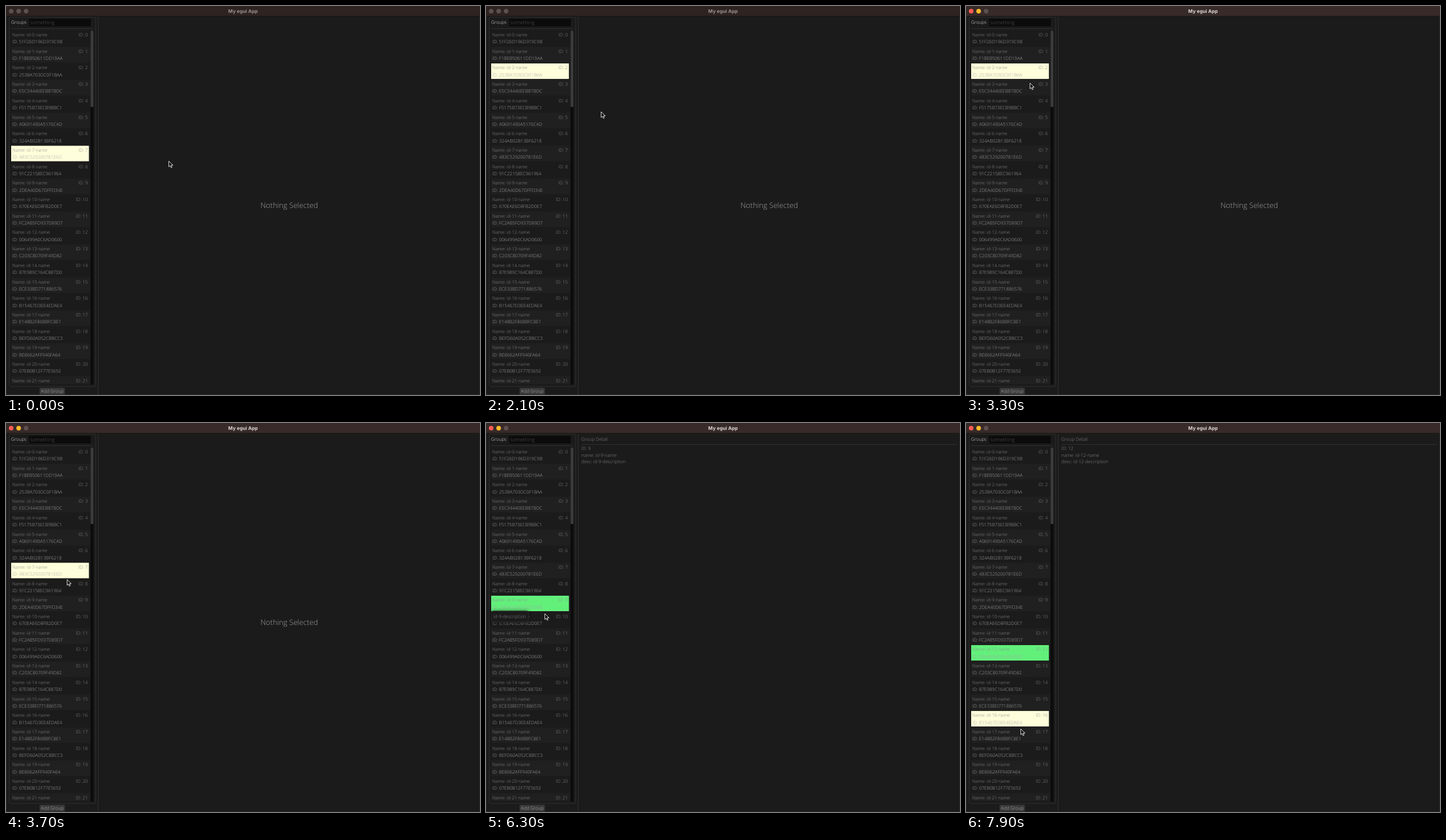
An HTML page that plays this animation: 825x678 px, repeating every 8000 ms.

```html
<!DOCTYPE html>
<html lang="en">
<head>
<meta charset="utf-8">
<title>My egui App</title>
<style>
  html, body { margin: 0; width: 100%; height: 100%; overflow: hidden; background: #1b1b1b; }
  svg { display: block; width: 825px; height: 678px; }
  text {
    font: 300 8px "Open Sans", "Noto Sans", sans-serif;
    fill: #8c8c8c;
    text-rendering: geometricPrecision;
    white-space: pre;
  }
  .name { font-size: 7.85px; }
  .hex { fill: #a6a6a6; }
  .end { text-anchor: end; }
  .mid { text-anchor: middle; }
  .strong { fill: #e2e2e2; }
  .hint { font-size: 9px; fill: #555; }
  .big { font-size: 13.1px; fill: #a0a0a0; }
  .line { fill: none; stroke: #353535; stroke-width: .8; }
  #bar { fill: #2e2321; }
  #title { font: 700 8.4px Inter, Roboto, sans-serif; fill: #9a908e; }
  .light { fill: #5b504e; }
  .active #bar { fill: #372a28; }
  .active #title { fill: #ded7d5; }
  .active #close { fill: #ff5b52; }
  .active #mini { fill: #fdbb2d; }
  .row { fill: none; }
  .odd { fill: #202020; }
  .mark { fill: none; }
  .hover { fill: #fffedb; }
  .picked { fill: #62f07b; }
</style>
</head>
<body>
<svg id="app" viewBox="0 0 825 678">
  <defs>
    <clipPath id="view"><rect x="6" y="42" width="142" height="617"/></clipPath>
    <filter id="soft" x="-30%" y="-80%" width="160%" height="260%"><feGaussianBlur stdDeviation="3.2"/></filter>
  </defs>
  <rect width="825" height="678" fill="#1b1b1b"/>
  <rect id="bar" width="825" height="18"/>
  <rect y="17.5" width="825" height="1" fill="#151212"/>
  <circle id="close" class="light" cx="9" cy="9" r="4"/>
  <circle id="mini" class="light" cx="22" cy="9" r="4"/>
  <circle class="light" cx="35" cy="9" r="4"/>
  <text id="title" class="mid" x="412.5" y="11.9">My egui App</text>

  <path class="line" d="M160.5 18.5V678M9 39.5H152"/>
  <rect class="line" x="5.5" y="19.5" width="150.5" height="643.5" rx="1.5"/>
  <text class="strong" x="9" y="30.6">Groups</text>
  <rect x="40" y="22.5" width="107.5" height="13" rx="1.3" fill="#0b0b0b"/>
  <text class="hint" x="42" y="32">something</text>

  <g id="rows" clip-path="url(#view)"></g>
  <rect x="147" y="42" width="5.5" height="618" rx="1.5" fill="#0c0c0c"/>
  <rect x="147.3" y="42.5" width="4.8" height="133.5" rx="1.5" fill="#3c3c3c"/>

  <rect x="58.5" y="665.5" width="44" height="11.5" rx="1.3" fill="#3a3a3a"/>
  <text class="mid" x="80.5" y="673.8" style="fill:#b4b4b4">Add Group</text>

  <text id="empty" class="big mid" x="493" y="352.4">Nothing Selected</text>
  <g id="detail">
    <text x="166" y="30.5">Group Detail:</text>
    <path class="line" d="M166 37.5H820"/>
    <text id="dId" x="166" y="47.4"></text>
    <text id="dName" x="166" y="58.8"></text>
    <text id="dDesc" x="166" y="70.1"></text>
  </g>

  <g id="tip">
    <rect class="box" x="9.5" y="0" height="19" rx="3" fill="#000" opacity=".65" filter="url(#soft)"/>
    <rect class="box" x="9.5" y="0" height="19" rx="3" fill="#1b1b1b" stroke="#343434" stroke-width=".7"/>
    <text id="tipText" x="13" y="11.9"></text>
  </g>

  <path d="M.5 18V677.5H824.5V18" fill="none" stroke="#2c2a2a"/>
  <path id="cursor" d="M.4 .4V10.2L2.7 8.1L4.2 11.8L5.9 11.1L4.4 7.5H7.6Z"
        fill="#000" stroke="#f4f4f4" stroke-width=".95" stroke-linejoin="round"/>
</svg>
<script>
const LOOP = 8000, STEP = 100, TOP = 42.7, PITCH = 28.7, ROW_H = 27;
const $ = id => document.getElementById(id);

const codes = `51F26D196D319C9B F1BEB50611DD19AA 253BA703DC0F1BAA E5C34440EEB87BDC
F5175B73ECB9BBC1 A0691490A5176CAD 324AB02B13BF6218 483C529200781E6D 91C22158EC961964
2DEA40D67DFFD34E 670EAE6D8FB2D0E7 FC2AB5FD937D89D7 006499A0C6AD0600 C203C80709F49D82
87E989C164C887D0 ECE33BD771886576 B15467D3EE4EDAE4 E148B2F86BBFC8E1 BEFD60A052CBBCC3
BE8662AFF940FA64 07EB0B12F77E5692`.split(/\s+/);

// [time, x, y] of the pointer tip
const path = [
  [0, 283, 270], [300, 215, 232], [500, 150, 196], [700, 106, 153], [800, 98, 138],
  [1000, 92, 102], [1200, 88, 70], [1400, 94, 52], [1600, 110, 72], [1800, 134, 118],
  [2100, 200, 184], [2500, 375, 232], [2700, 402, 238], [3000, 250, 186], [3200, 130, 140],
  [3300, 111, 134], [3400, 108, 160], [3600, 106, 246], [3800, 106, 299], [4100, 106, 299],
  [4400, 106, 326], [4900, 106, 326], [5100, 105, 331], [6100, 105, 331], [6200, 102, 332],
  [6300, 102, 332], [6900, 100, 402], [7000, 100, 402], [7600, 100, 406], [7700, 100, 406],
  [7900, 95, 533]
];

// [time, value] switches
const hovers = [
  [0, 7], [600, 5], [700, 4], [900, 3], [1000, 2], [1100, 1], [1400, 0], [1600, 1], [1700, 2],
  [3400, 3], [3500, 5], [3600, 6], [3700, 7], [3800, 8], [4200, 9], [6500, 10], [6700, 11],
  [6800, 12], [7800, 14], [7900, 16]
];
const picks = [[0, -1], [5400, 9], [7200, 12]];
const tips = [[0, false], [4500, true], [5000, false], [5700, true], [6400, false], [7500, true], [7800, false]];
const focus = [[0, false], [2500, true]];

const at = (list, t) => list.filter(e => e[0] <= t).pop()[1];

function pointer(t) {
  const i = path.findIndex(p => p[0] > t);
  if (i < 0) return path[path.length - 1].slice(1);
  const [a, b] = [path[i - 1], path[i]];
  const k = (t - a[0]) / (b[0] - a[0]);
  return [1, 2].map(n => a[n] + (b[n] - a[n]) * k);
}

const rowTop = i => TOP + PITCH * i;

function rowMarkup(i) {
  const y = rowTop(i);
  return `<rect class="row ${i % 2 ? 'odd' : ''}" x="9" y="${y}" width="137.5" height="${ROW_H}"/>
    <rect class="mark" x="9" y="${y}" width="135.3" height="${ROW_H}"/>
    <text class="name" x="11" y="${y + 10.3}">Name: id-${i}-name</text>
    <text class="end" x="142.3" y="${y + 10.3}">ID: ${i}</text>
    <text class="hex" x="11" y="${y + 22.6}">ID: ${codes[i] || ''}</text>`;
}

$('rows').innerHTML = Array.from({ length: 22 }, (_, i) => rowMarkup(i)).join('');
const marks = document.querySelectorAll('.mark');
const boxes = document.querySelectorAll('.box');
const show = (el, on) => el.style.display = on ? '' : 'none';

function draw(t) {
  const hover = at(hovers, t), pick = at(picks, t), tip = at(tips, t);
  $('app').classList.toggle('active', at(focus, t));
  marks.forEach((m, i) => {
    m.setAttribute('class', 'mark' + (i === pick ? ' picked' : i === hover ? ' hover' : ''));
  });

  show($('empty'), pick < 0);
  show($('detail'), pick >= 0);
  $('dId').textContent = `ID: ${pick}`;
  $('dName').textContent = `name: id-${pick}-name`;
  $('dDesc').textContent = `desc: id-${pick}-description`;

  show($('tip'), tip);
  $('tipText').textContent = `id-${hover}-description`;
  boxes.forEach(b => b.setAttribute('width', hover > 9 ? 69 : 64.5));
  $('tip').setAttribute('transform', `translate(0 ${rowTop(hover) + ROW_H - .3})`);
  $('cursor').setAttribute('transform', `translate(${pointer(t)})`);
}

let last = -1;
function tick() {
  const t = Math.floor(performance.now() % LOOP / STEP) * STEP;
  if (t !== last) draw(last = t);
  requestAnimationFrame(tick);
}
draw(0);
requestAnimationFrame(tick);
</script>
</body>
</html>
```
